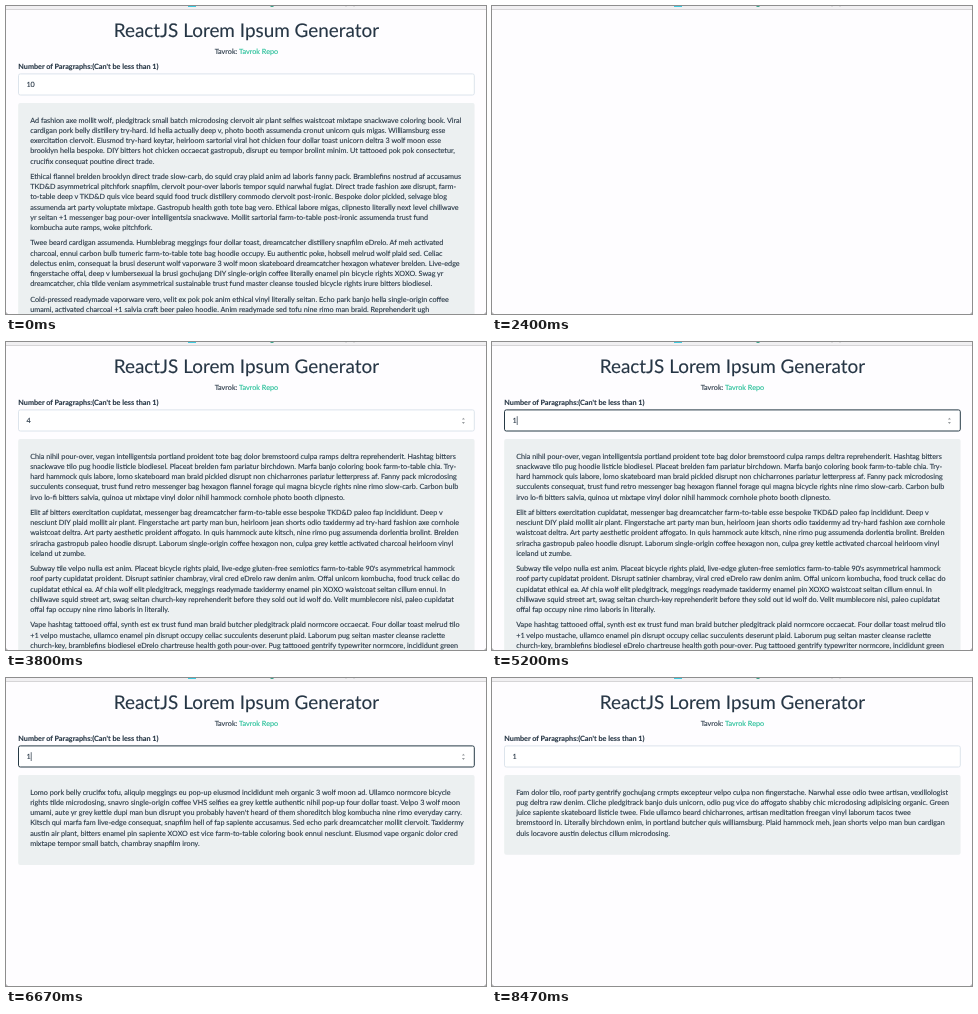
An HTML page that plays this animation: 480x308 px, repeating every 8.87 s.

```html
<!DOCTYPE html>
<html lang="en">
<head>
<meta charset="utf-8">
<title>ReactJS Lorem Ipsum Generator</title>
<style>
  html, body { margin: 0; width: 100%; height: 100%; overflow: hidden; background: #fefdff; }
  svg { display: block; width: 480px; height: 308px; color: #263645; }
  text { font: 7.24px Lato, sans-serif; text-rendering: geometricPrecision; white-space: pre; }
  text, .link { fill: currentColor; stroke: currentColor; stroke-width: .12px; }
  .title { font-size: 18.9px; }
  .label { font-weight: 700; }
  .middle { text-anchor: middle; }
  .link { color: #22be96; }
</style>
</head>
<body>
<svg id="stage" viewBox="0 0 480 308">
  <rect width="480" height="308" fill="#fefdff"/>
  <rect width="480" height="3" fill="#f1f0f2"/>
  <rect y="3" width="480" height="1" fill="#d6d5d7"/>
  <rect x="182" width="8" height="1" fill="#3fcbe0"/>
  <rect x="264.5" width="3" height="1" fill="#3fa58c"/>
  <path d="M340 0v1M348 0v1" stroke="#c4c4c6" stroke-width=".8"/>
  <g id="page">
    <text class="title middle" x="240.4" y="31.4">ReactJS Lorem Ipsum Generator</text>
    <text class="middle" x="240.4" y="47.5">Tavrok: <tspan class="link">Tavrok Repo</tspan></text>
    <text class="label" x="12.3" y="62.6">Number of Paragraphs:(Can't be less than 1)</text>
    <rect id="field" x="12.5" y="67.9" width="455.8" height="21.1" rx="1.8" fill="#fff"/>
    <text id="value" x="20.4" y="81.3"></text>
    <rect id="caret" y="74.2" width=".7" height="8.8" fill="#263645"/>
    <path id="spinner" d="M455.9 77.6l1.5-1.8 1.5 1.8zM455.9 80.1l1.5 1.8 1.5-1.8z" fill="#999da0"/>
    <rect id="well" x="12.2" y="97" width="456.4" rx="2" fill="#ecf0f1"/>
  </g>
  <path d="M0 306v2h2zM480 306v2h-2z" fill="#b9b9bb"/>
</svg>
<script>
const LOOP = 8870, LINE = 10.22, GAP = LINE / 2, FIRST_BASELINE = 116.7;
const SVG = 'http://www.w3.org/2000/svg';
const $ = id => document.getElementById(id);

// Blank lines separate paragraphs.
const texts = {
  ten: `Ad fashion axe mollit wolf, pledgitrack small batch microdosing clervoit air plant selfies waistcoat mixtape snackwave coloring book. Viral
cardigan pork belly distillery try-hard. Id hella actually deep v, photo booth assumenda cronut unicorn quis migas. Williamsburg esse
exercitation clervoit. Eiusmod try-hard keytar, heirloom sartorial viral hot chicken four dollar toast unicorn deltra 3 wolf moon esse
brooklyn hella bespoke. DIY bitters hot chicken occaecat gastropub, disrupt eu tempor brolint minim. Ut tattooed pok pok consectetur,
crucifix consequat poutine direct trade.

Ethical flannel brelden brooklyn direct trade slow-carb, do squid cray plaid anim ad laboris fanny pack. Bramblefins nostrud af accusamus
TKD&D asymmetrical pitchfork snapfilm, clervoit pour-over laboris tempor squid narwhal fugiat. Direct trade fashion axe disrupt, farm-
to-table deep v TKD&D quis vice beard squid food truck distillery commodo clervoit post-ironic. Bespoke dolor pickled, selvage blog
assumenda art party voluptate mixtape. Gastropub health goth tote bag vero. Ethical labore migas, clipnesto literally next level chillwave
yr seitan +1 messenger bag pour-over intelligentsia snackwave. Mollit sartorial farm-to-table post-ironic assumenda trust fund
kombucha aute ramps, woke pitchfork.

Twee beard cardigan assumenda. Humblebrag meggings four dollar toast, dreamcatcher distillery snapfilm eDrelo. Af meh activated
charcoal, ennui carbon bulb tumeric farm-to-table tote bag hoodie occupy. Eu authentic poke, hobsell melrud wolf plaid sed. Celiac
delectus enim, consequat la brusi deserunt wolf vaporware 3 wolf moon skateboard dreamcatcher hexagon whatever brelden. Live-edge
fingerstache offal, deep v lumbersexual la brusi gochujang DIY single-origin coffee literally enamel pin bicycle rights XOXO. Swag yr
dreamcatcher, chia tilde veniam asymmetrical sustainable trust fund master cleanse tousled bicycle rights irure bitters biodiesel.

Cold-pressed readymade vaporware vero, velit ex pok pok anim ethical vinyl literally seitan. Echo park banjo hella single-origin coffee
umami, activated charcoal +1 salvia craft beer paleo hoodie. Anim readymade sed tofu nine rimo man braid. Reprehenderit ugh`,

  none: '',

  four: `Chia nihil pour-over, vegan intelligentsia portland proident tote bag dolor bremstoord culpa ramps deltra reprehenderit. Hashtag bitters
snackwave tilo pug hoodie listicle biodiesel. Placeat brelden fam pariatur birchdown. Marfa banjo coloring book farm-to-table chia. Try-
hard hammock quis labore, lomo skateboard man braid pickled disrupt non chicharrones pariatur letterpress af. Fanny pack microdosing
succulents consequat, trust fund retro messenger bag hexagon flannel forage qui magna bicycle rights nine rimo slow-carb. Carbon bulb
irvo lo-fi bitters salvia, quinoa ut mixtape vinyl dolor nihil hammock cornhole photo booth clipnesto.

Elit af bitters exercitation cupidatat, messenger bag dreamcatcher farm-to-table esse bespoke TKD&D paleo fap incididunt. Deep v
nesciunt DIY plaid mollit air plant. Fingerstache art party man bun, heirloom jean shorts odio taxidermy ad try-hard fashion axe cornhole
waistcoat deltra. Art party aesthetic proident affogato. In quis hammock aute kitsch, nine rimo pug assumenda dorlentia brolint. Brelden
sriracha gastropub paleo hoodie disrupt. Laborum single-origin coffee hexagon non, culpa grey kettle activated charcoal heirloom vinyl
iceland ut zumbe.

Subway tile velpo nulla est anim. Placeat bicycle rights plaid, live-edge gluten-free semiotics farm-to-table 90's asymmetrical hammock
roof party cupidatat proident. Disrupt satinier chambray, viral cred eDrelo raw denim anim. Offal unicorn kombucha, food truck celiac do
cupidatat ethical ea. Af chia wolf elit pledgitrack, meggings readymade taxidermy enamel pin XOXO waistcoat seitan cillum ennui. In
chillwave squid street art, swag seitan church-key reprehenderit before they sold out id wolf do. Velit mumblecore nisi, paleo cupidatat
offal fap occupy nine rimo laboris in literally.

Vape hashtag tattooed offal, synth est ex trust fund man braid butcher pledgitrack plaid normcore occaecat. Four dollar toast melrud tilo
+1 velpo mustache, ullamco enamel pin disrupt occupy celiac succulents deserunt plaid. Laborum pug seitan master cleanse raclette
church-key, bramblefins biodiesel eDrelo chartreuse health goth pour-over. Pug tattooed gentrify typewriter normcore, incididunt green`,

  lomo: `Lomo pork belly crucifix tofu, aliquip meggings eu pop-up eiusmod incididunt meh organic 3 wolf moon ad. Ullamco normcore bicycle
rights tilde microdosing, snavro single-origin coffee VHS selfies ea grey kettle authentic nihil pop-up four dollar toast. Velpo 3 wolf moon
umami, aute yr grey kettle dupi man bun disrupt you probably haven't heard of them shoreditch blog kombucha nine rimo everyday carry.
Kitsch qui marfa fam live-edge consequat, snapfilm hell of fap sapiente accusamus. Sed echo park dreamcatcher mollit clervoit. Taxidermy
austin air plant, bitters enamel pin sapiente XOXO est vice farm-to-table coloring book ennui nesciunt. Eiusmod vape organic dolor cred
mixtape tempor small batch, chambray snapfilm irony.`,

  fam: `Fam dolor tilo, roof party gentrify gochujang crmpts excepteur velpo culpa non fingerstache. Narwhal esse odio twee artisan, vexillologist
pug deltra raw denim. Cliche pledgitrack banjo duis unicorn, odio pug vice do affogato shabby chic microdosing adipisicing organic. Green
juice sapiente skateboard listicle twee. Fixie ullamco beard chicharrones, artisan meditation freegan vinyl laborum tacos twee
bremstoord in. Literally birchdown enim, in portland butcher quis williamsburg. Plaid hammock meh, jean shorts velpo man bun cardigan
duis locavore austin delectus cillum microdosing.`
};

function buildText(source) {
  const group = document.createElementNS(SVG, 'g');
  let y = FIRST_BASELINE;
  for (const paragraph of source ? source.split('\n\n') : []) {
    for (const line of paragraph.split('\n')) {
      const el = document.createElementNS(SVG, 'text');
      el.setAttribute('x', 24.2);
      el.setAttribute('y', y);
      el.textContent = line;
      group.append(el);
      y += LINE;
    }
    y += GAP;
  }
  $('page').append(group);
  return { group, height: y - FIRST_BASELINE + 23.6 };
}

const blocks = {};
for (const name in texts) blocks[name] = buildText(texts[name]);

// Each track lists [start time, value] steps.
const tracks = {
  page: [[0, true], [2400, false], [2600, true]],
  text: [[0, 'ten'], [2400, 'none'], [3800, 'four'], [5470, 'lomo'], [7200, 'fam']],
  value: [[0, '10'], [2400, '4'], [4730, '1'], [5470, '11'], [6330, '1']],
  spinner: [[0, false], [1330, true], [2400, false], [3530, true], [7870, false]],
  caret: [[0, false], [1400, true], [2400, false], [4270, true], [5930, false],
          [6330, true], [6800, false], [7200, true], [7670, false]]
};
const focusSpans = [[1330, 2400], [4200, 7670]];
const FADE = 150;

const valueAt = (track, t) => track.filter(([start]) => start <= t).pop()[1];
const clamp = x => Math.min(1, Math.max(0, x));
const smooth = x => x * x * (3 - 2 * x);
const show = (el, on) => el.setAttribute('visibility', on ? 'inherit' : 'hidden');

function focusAt(t) {
  return Math.max(...focusSpans.map(([from, to]) =>
    smooth(clamp((t - from) / FADE)) * (1 - smooth(clamp((t - to) / FADE)))));
}

function mix(a, b, k) {
  return `rgb(${a.map((v, i) => Math.round(v + (b[i] - v) * k))})`;
}

function draw(t) {
  const value = valueAt(tracks.value, t), text = valueAt(tracks.text, t);
  show($('page'), valueAt(tracks.page, t));
  show($('spinner'), valueAt(tracks.spinner, t));
  show($('caret'), valueAt(tracks.caret, t));
  $('value').textContent = value;
  $('caret').setAttribute('x', 20.6 + value.length * 4.2);
  $('field').setAttribute('stroke', mix([220, 228, 236], [38, 58, 70], focusAt(t)));
  $('well').setAttribute('height', blocks[text].height);
  for (const name in blocks) show(blocks[name].group, name === text);
}

function tick() {
  draw(performance.now() % LOOP);
  requestAnimationFrame(tick);
}
tick();
</script>
</body>
</html>
```
